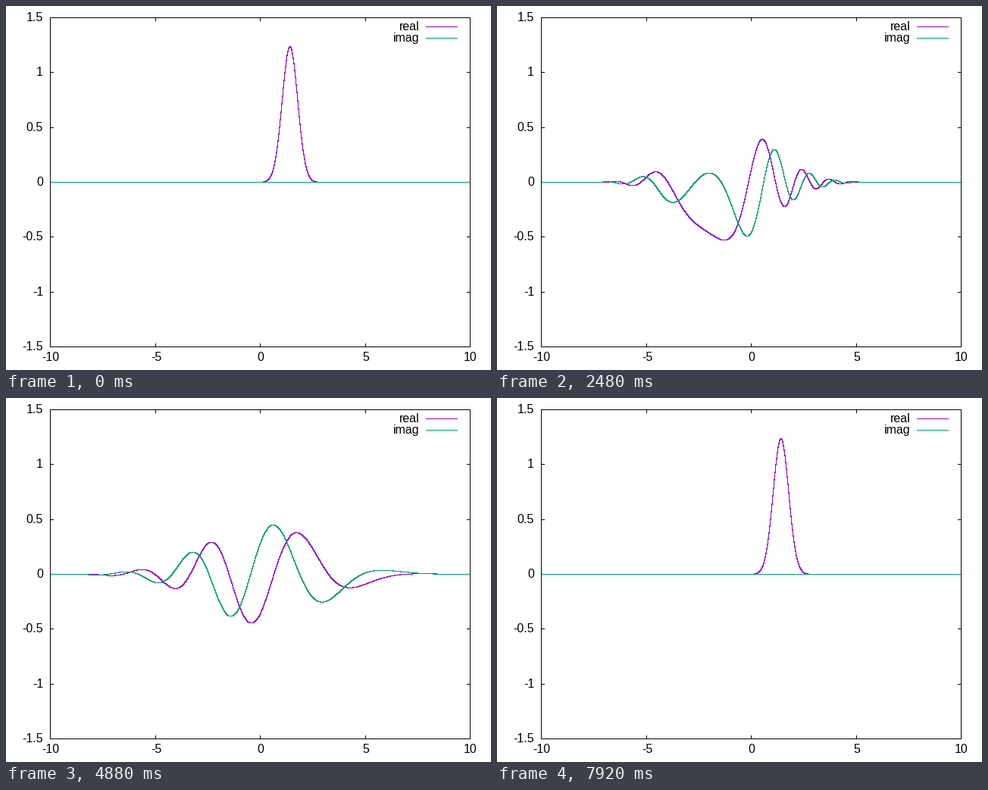
Recreate the animation shown at these times as a matplotlib script. Size 640x480 px, loop 8000 ms.

```python
"""Squeezed coherent state swinging in a harmonic well (hbar = m = omega = 1)."""
import numpy as np
import matplotlib.pyplot as plt
from matplotlib.animation import FuncAnimation

W, H, DPI = 640, 480, 100
FRAMES, INTERVAL = 100, 80
LEFT, RIGHT, TOP, BOTTOM = 58, 612, 15, 449
X_MAX, Y_MAX = 10, 1.5
PURPLE, TEAL = "#9400d3", "#009e73"
SIGMA, X0 = np.exp(-1), np.sqrt(2)    # initial width and displacement
TICK = 4

plt.rcParams["path.simplify"] = False
plt.rcParams["font.family"] = "Liberation Sans"

fig = plt.figure(figsize=(W / DPI, H / DPI), dpi=DPI, facecolor="white")
ax = fig.add_axes([0, 0, 1, 1])
ax.set_xlim(0, W)
ax.set_ylim(H, 0)
ax.axis("off")


def to_col(x):
    return np.floor(LEFT + (x + X_MAX) / (2 * X_MAX) * (RIGHT - LEFT) + 0.5)


def to_row(y):
    return np.floor(BOTTOM - (y + Y_MAX) / (2 * Y_MAX) * (BOTTOM - TOP) + 0.5)


def pixel_line(cols, rows, color="black", zorder=1):
    """Crisp one-pixel line through pixel centres."""
    line, = ax.plot(np.add(cols, 0.5), np.add(rows, 0.5), color=color,
                    lw=72 / DPI, antialiased=False, snap=False,
                    solid_capstyle="projecting", zorder=zorder)
    return line


def label(x, row, text, ha):
    ax.text(x, row + 5, text, ha=ha, va="baseline", fontsize=16 * 72 / DPI)


def draw_axes():
    pixel_line([LEFT, RIGHT, RIGHT, LEFT, LEFT],
               [TOP, TOP, BOTTOM, BOTTOM, TOP], zorder=4)
    for x in range(-10, 11, 5):
        col = to_col(x)
        pixel_line([col, col], [TOP, TOP + TICK])
        pixel_line([col, col], [BOTTOM - TICK, BOTTOM])
        label(col + 1, 463, f"{x}", "center")
    for y in np.arange(-1.5, 1.6, 0.5):
        row = to_row(y)
        pixel_line([LEFT, LEFT + TICK], [row, row])
        pixel_line([RIGHT - TICK, RIGHT], [row, row])
        label(49, row, f"{y:g}", "right")


def draw_key():
    for name, row, color in (("real", 27, PURPLE), ("imag", 42, TEAL)):
        label(546, row, name, "right")
        pixel_line([554, 595], [row, row], color)


def psi(x, t):
    """Exact Gaussian wave packet at time t."""
    q, p = X0 * np.cos(t), -X0 * np.sin(t)
    spread = np.cos(t) + 1j * np.sin(t) / SIGMA**2
    rate = -np.sin(t) + 1j * np.cos(t) / SIGMA**2
    # arg(spread) follows t continuously, so the root keeps its branch
    arg = t + np.angle(spread * np.exp(-1j * t))
    amp = (np.pi * SIGMA**2) ** -0.25 / np.sqrt(abs(spread))
    phase = 0.5 * rate / spread * (x - q) ** 2 + p * (x - q) + p * q / 2
    return amp * np.exp(1j * (phase - arg / 2))


COLS = np.arange(LEFT, RIGHT + 1)
XS = (COLS - LEFT) / (RIGHT - LEFT) * 2 * X_MAX - X_MAX


def trace(values):
    """Pixel centres along the curve, stepping one pixel at a time."""
    rows = to_row(values)
    drop = np.diff(rows)
    steps = np.maximum(abs(drop), 1).astype(int)
    seg = np.repeat(np.arange(len(steps)), steps)
    first = np.cumsum(steps) - steps
    frac = (np.arange(steps.sum()) - first[seg]) / steps[seg]
    cols = np.append(np.floor(COLS[seg] + frac + 0.5), COLS[-1])
    rows = np.append(np.floor(rows[seg] + frac * drop[seg] + 0.5), rows[-1])
    return cols + 0.5, rows + 0.5


draw_axes()
draw_key()
real_line = pixel_line([], [], PURPLE, zorder=2)
imag_line = pixel_line([], [], TEAL, zorder=3)


def update(i):
    wave = psi(XS, 4 * np.pi * i / (FRAMES - 1))
    real_line.set_data(*trace(wave.real))
    imag_line.set_data(*trace(wave.imag))
    return real_line, imag_line


anim = FuncAnimation(fig, update, frames=FRAMES, interval=INTERVAL,
                     repeat=True, repeat_delay=0)
plt.show()
```
